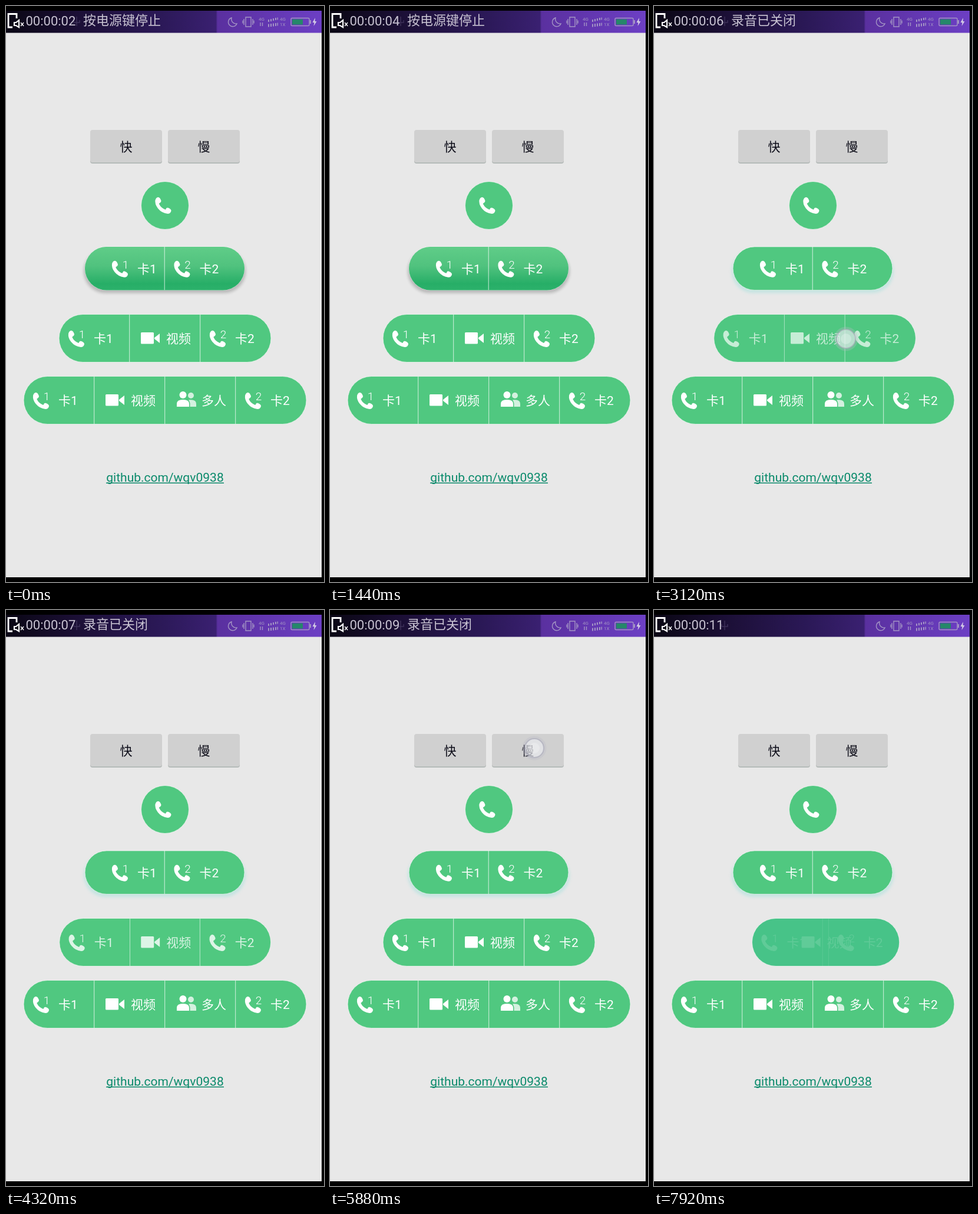
An HTML page that plays this animation: 540x976 px, repeating every 8 s.

```html
<!DOCTYPE html>
<html lang="zh">
<head>
<meta charset="utf-8">
<title>Call buttons</title>
<style>
  html, body { margin: 0; width: 100%; height: 100%; overflow: hidden; background: #000; }
  svg { display: block; width: 100%; height: 100%; }
  text { font: 21px Roboto, "Noto Sans CJK SC", "Noto Sans CJK", sans-serif; }
  .status { font-size: 22px; fill: #c8c3d2; }
  .tiny { font-size: 8px; fill: #a394c4; }
  .sim { font-size: 19px; font-weight: 300; }
  .mid { text-anchor: middle; }
  .line { fill: none; stroke: #a394c4; stroke-width: 1.4; }
</style>
</head>
<body>
<svg id="stage" viewBox="0 0 540 976">
  <defs>
    <linearGradient id="bar">
      <stop offset="0" stop-color="#0a0714"/>
      <stop offset=".22" stop-color="#1b0f35"/>
      <stop offset=".5" stop-color="#2c1959"/>
      <stop offset=".665" stop-color="#3a2071"/>
      <stop offset=".67" stop-color="#5a309f"/>
      <stop offset="1" stop-color="#6c3fc4"/>
    </linearGradient>
    <linearGradient id="gloss" x2="0" y2="1">
      <stop offset="0" stop-color="#60cd88"/>
      <stop offset=".45" stop-color="#50c27e"/>
      <stop offset=".85" stop-color="#27ae67"/>
      <stop offset="1" stop-color="#2cb16b"/>
    </linearGradient>
    <filter id="soft" x="-20%" y="-30%" width="140%" height="160%"><feGaussianBlur stdDeviation="2.5"/></filter>
    <g id="phone">
      <path d="M-13-9Q-11.5-14-8-14Q-5-14-3-8Q-3-5.5-5-4.5Q-7-3.5-6.5-2.5Q-3.5 4 4 7Q5 7 5.5 5Q7 3 9 4Q14 6 14 9Q13 14 8 14Q-2 13-8.5 5Q-14-2-13-9Z"/>
    </g>
    <g id="video">
      <rect y="-10" width="22" height="19.5" rx="1.5"/>
      <path d="M23-1L32-8V8L23 1Z"/>
    </g>
    <g id="people">
      <circle cx="10.5" cy="-9" r="6"/>
      <path d="M0 11V6Q0-1 10.5-1Q21-1 21 6V11Z"/>
      <g opacity=".75">
        <circle cx="24" cy="-8" r="5"/>
        <path d="M22.5 11V5Q22 2 20-.5Q33-2 33 6V11Z"/>
      </g>
    </g>
    <g id="dial" fill="none" stroke="#d8f1f8" stroke-width="2">
      <rect x="-12.5" y="-11" width="25" height="23" rx="2"/>
      <path d="M-4.2-11V12M4.2-11V12M-12.5-3.5H12.5M-12.5 4.2H12.5"/>
      <path d="M-3.5-12L0-14.5L3.5-12Z" fill="#d8f1f8" stroke-width="1"/>
    </g>
  </defs>

  <rect y="8" width="536" height="960" fill="#e8e8e8"/>
  <rect y="8" width="536" height="37.5" fill="url(#bar)"/>

  <g fill="none" stroke="#fff" stroke-width="2.8">
    <path d="M18 21V13.5H4V36H11"/>
    <path d="M14 28H17L22 24V36L17 33H14Z" stroke-width="2.2"/>
    <path d="M25 28L30 34M30 28L25 34" stroke-width="1.4"/>
  </g>
  <path d="M120 18V34M115 24V28H125V24" class="line" opacity=".25"/>
  <text id="clock" class="status" x="33.5" y="32.5"></text>
  <text id="notice" class="status" x="131" y="32"></text>

  <path class="line" d="M383 20A7.5 7.5 0 1 0 392 30A8 8 0 0 1 383 20Z"/>
  <path class="line" d="M407 19H416V35H407ZM404 22V32M419 22V32M402 24.500V29.500M421 24.500V29.500"/>
  <text class="tiny" x="429" y="25">4G</text>
  <path class="line" d="M432 28V34M435.500 28V34" stroke-width="1"/>
  <path class="line" d="M445 25H447M449 24H451M453 23H455M457 22H459M460.500 21.500H462" style="stroke-width:4"/>
  <path class="line" d="M445 33H447M449 32.500H451M453 32H455M457 31.500H459M460.500 31H462" style="stroke-width:5"/>
  <text class="tiny" x="465" y="25">4G</text>
  <text class="tiny" x="465" y="34">1X</text>
  <rect class="line" x="484" y="20.500" width="31" height="13" rx="2"/>
  <rect x="515.500" y="24" width="2.500" height="6" fill="#a394c4"/>
  <rect x="486" y="22.500" width="18" height="9" fill="#25876a"/>
  <path d="M525 20L520.500 28H523.500L522.500 34L527.500 26H524.500Z" fill="#d5cde6"/>

  <g id="buttons"></g>
  <g id="pills"></g>

  <text class="mid" x="270" y="806" fill="#0a8a6b">github.com/wqv0938</text>
  <rect x="170" y="807.500" width="200" height="1.500" fill="#0a8a6b"/>

  <g id="touch">
    <circle r="20.500" fill="#b8b8c8" opacity=".3"/>
    <circle r="16" fill="#f4f6fa" fill-opacity=".55" stroke="#a9a9b8" stroke-opacity=".65" stroke-width="2"/>
    <circle r="9" fill="#fff" opacity=".25"/>
  </g>
</svg>

<script>
const LOOP = 8000, STEP = 120, FAST = 500, SLOW = 3800;
const GREEN = [80, 200, 128], BLUE = [0, 152, 204];
const END_RIGHT = 506;
const $ = id => document.getElementById(id);

function add(parent, tag, attrs = {}, text) {
  const el = document.createElementNS("http://www.w3.org/2000/svg", tag);
  set(el, attrs);
  if (text) el.textContent = text;
  return parent.appendChild(el);
}
function set(el, attrs) {
  for (const key in attrs) el.setAttribute(key, attrs[key]);
}
const clamp = x => Math.min(1, Math.max(0, x));
const mix = (a, b, k) => a + (b - a) * k;
const ease = x => (1 - Math.cos(Math.PI * clamp(x))) / 2;

for (const [x, label] of [[143, "快"], [275, "慢"]]) {
  add($("buttons"), "rect", { x, y: 212, width: 122, height: 55, rx: 4, fill: "#b5bbb9" });
  add($("buttons"), "rect", { x, y: 210, width: 122, height: 55, rx: 4, fill: "#d0d0d0" });
  add($("buttons"), "text", { x: x + 61, y: 245.5, class: "mid", fill: "#0c0c18" }, label);
}

const sim = (n, dx = 0) => ({ icon: "phone", label: "卡" + n, n, dx });
const video = { icon: "video", label: "视频" };
const group = { icon: "people", label: "多人" };

const pills = [
  { left: 229.5, width: 81, y: 338, h: 81, items: [{ icon: "phone", dx: 8 }], tap: [275, 342],
    runs: [[180, 930, FAST]] },
  { left: 134, width: 271, y: 444.7, h: 73.5, items: [sim(1, 30), sim(2)], tap: [300, 448], raised: true,
    runs: [[1630, 2380, FAST]] },
  { left: 90, width: 360, y: 563, h: 81, items: [sim(1), video, sim(2)], tap: [326, 564],
    runs: [[3080, 3830, FAST], [7100, 99999, SLOW]] },
  { left: 30, width: 480, y: 668, h: 81, items: [sim(1), group, sim(2)], tap: [320, 670],
    runs: [[4500, 5200, FAST]] }
];
pills[3].items.splice(1, 0, video);

function buildItem(parent, item, y) {
  const g = add(parent, "g");
  const isPhone = item.icon === "phone", dx = item.dx || 0;
  add(g, "use", { href: "#" + item.icon, x: dx + (isPhone ? 29 : item.icon === "video" ? 19 : 20), y: isPhone && item.label ? y + 1 : y });
  if (item.n) add(g, "text", { x: dx + 39, y: y, class: "sim mid" }, String(item.n));
  if (item.label) add(g, "text", { x: dx + (isPhone ? 59 : 62), y: y + 8 }, item.label);
  return g;
}

pills.forEach((p, i) => {
  const root = add($("pills"), "g");
  const box = { y: p.y - p.h / 2, height: p.h, rx: p.h / 2 };
  if (p.raised) p.shadow = add(root, "rect", { ...box, y: box.y + 5, filter: "url(#soft)" });
  p.body = add(root, "rect", { ...box, stroke: "#f6f8f6", "stroke-opacity": .7 });
  if (p.raised) p.gloss = add(root, "rect", { ...box, fill: "url(#gloss)" });
  p.clip = add(add(root, "clipPath", { id: "clip" + i }), "rect", box);
  p.content = add(add(root, "g", { "clip-path": `url(#clip${i})` }), "g", { fill: "#fff" });
  p.seg = p.width / p.items.length;
  p.parts = p.items.map(item => buildItem(p.content, item, p.y));
  p.lines = p.items.slice(1).map(() =>
    add(p.content, "rect", { y: box.y, width: 1, height: p.h, opacity: .75 }));
  p.dial = add(root, "use", { href: "#dial" });
});

function drawPill(p, t) {
  let u = 0, opening = false;
  for (const [close, open, time] of p.runs) {
    u += clamp((t - close) / time) - clamp((t - open) / time);
    opening ||= t > open && t < open + time;
  }
  const n = p.items.length;
  const width = mix(p.width, p.h, ease(u * 2));
  const center = mix(p.left + p.width / 2, END_RIGHT - p.h / 2, ease(u));
  const x = center - width / 2;
  const fromLeft = x - p.left, fromRight = x + width - p.left - p.width;
  const color = GREEN.map((c, i) => Math.round(mix(c, BLUE[i], ease(u))));

  set(p.body, { x, width, fill: `rgb(${color})` });
  set(p.clip, { x, width });
  set(p.content, { opacity: clamp(1 - u * (opening ? 10 : 4)) });
  p.parts.forEach((part, i) => {
    const shift = n > 1 ? mix(fromLeft, fromRight, i / (n - 1)) : fromLeft;
    set(part, { transform: `translate(${p.left + i * p.seg + shift} 0)` });
  });
  p.lines.forEach((line, i) => {
    const shift = mix(fromLeft, fromRight, n > 2 ? i / (n - 2) : .5);
    set(line, { x: p.left + (i + 1) * p.seg + shift - .8 });
  });
  set(p.dial, {
    opacity: clamp(u * 2 - 1),
    transform: `translate(${center} ${p.y + 1}) scale(${p.raised ? 1.12 : 1})`
  });
  if (p.raised) {
    const fresh = t < p.runs[0][0];
    set(p.gloss, { x, width, opacity: fresh ? 1 : 0 });
    set(p.shadow, { x: x - 2, width: width + 4, fill: fresh ? "#000" : "#a5e0dc", opacity: fresh ? .2 : .5 });
  }
}

const taps = [[5870, 347, 234]];
for (const p of pills)
  for (const [close, open] of p.runs)
    taps.push([close, ...p.tap], [open, END_RIGHT - p.h / 2, p.y]);

function frame() {
  const t = Math.floor(performance.now() % LOOP / STEP) * STEP;
  const seconds = t < 120 ? 2 : Math.floor(t / 1000 + 3.35);
  $("clock").textContent = "00:00:" + String(seconds).padStart(2, "0");
  $("notice").textContent = t < 2700 ? "按电源键停止" : t < 6200 ? "录音已关闭" : "";
  for (const p of pills) drawPill(p, t);
  const tap = taps.find(([time]) => t > time - 90 && t < time + 60);
  set($("touch"), tap
    ? { opacity: 1, transform: `translate(${tap[1]} ${tap[2]})` }
    : { opacity: 0 });
  requestAnimationFrame(frame);
}
frame();
</script>
</body>
</html>
```
